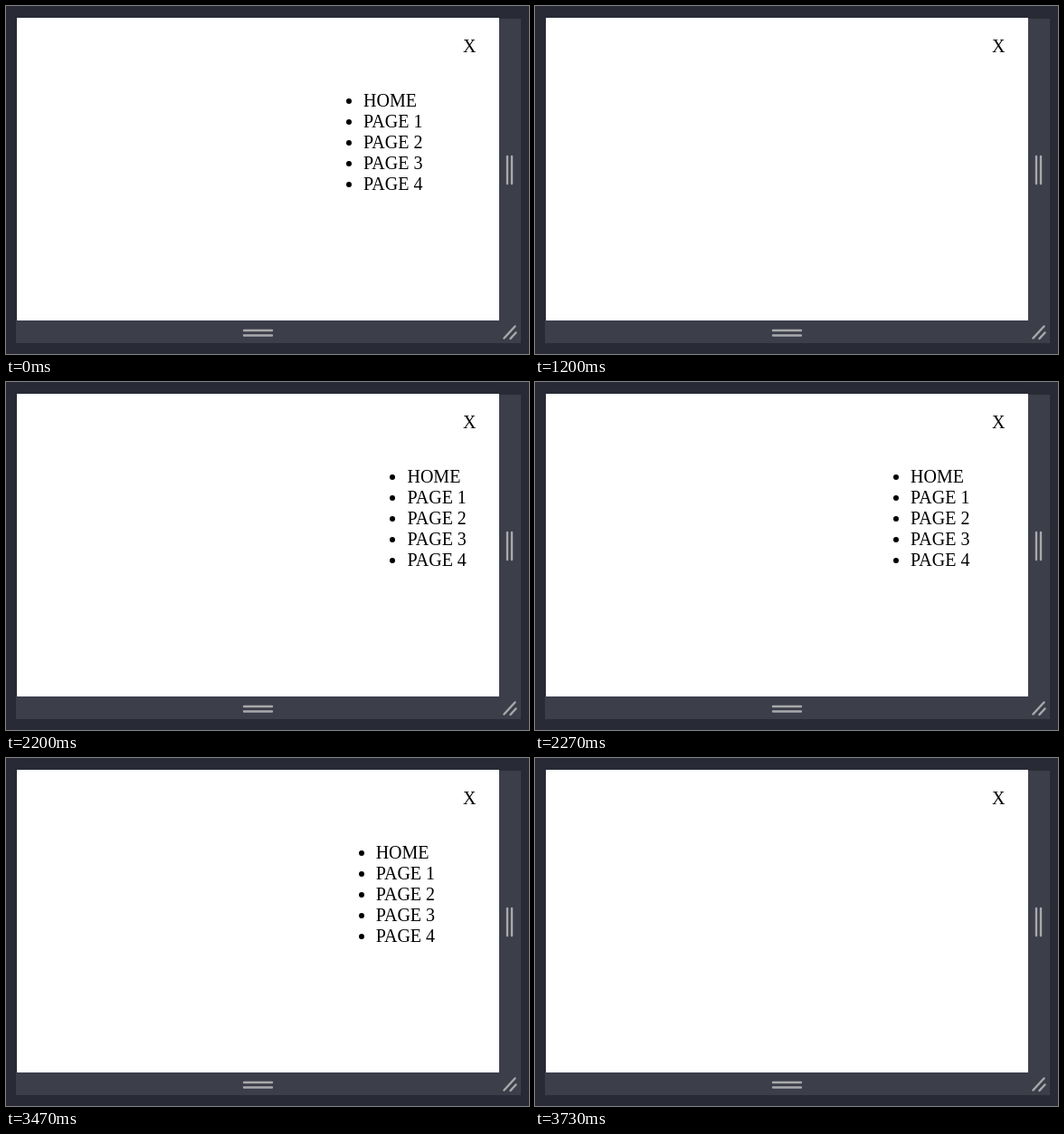
Write an HTML page that moves like this. It is 578x384 px and loops after 4.87 s.

```html
<!DOCTYPE html>
<html lang="en">
<head>
<meta charset="utf-8">
<title>Sliding menu</title>
<style>
  html, body { margin: 0; width: 100%; height: 100%; overflow: hidden; background: #282a35; }
  svg { position: absolute; left: 0; top: 0; }
  .page {
    position: absolute; left: 12px; top: 13px; width: 533px; height: 334px;
    overflow: hidden; background: #fff; color: #000;
    font: 20px/23px "Liberation Serif", "Times New Roman", serif;
  }
  .close { position: absolute; left: 493px; top: 20px; }
  ul { position: absolute; top: 80px; margin: 0; padding-left: 40px; white-space: nowrap; }
</style>
</head>
<body>
<svg width="578" height="384">
  <path fill="#3c3e4a" d="M545 14H569V372H11V347H545Z"/>
  <path fill="none" stroke="#a9a9ab" stroke-width="2.4" stroke-linecap="round"
    d="M554 166V196M559 166V196M263 358H294M263 363.5H294M550.5 366.5L562.5 353.5M557.5 367L563.5 360.5"/>
</svg>
<div class="page">
  <div class="close">X</div>
  <ul id="menu"><li>HOME</li><li>PAGE 1</li><li>PAGE 2</li><li>PAGE 3</li><li>PAGE 4</li></ul>
</div>
<script>
const LOOP = 4870, SLIDE = 400, TRAVEL = 190, OPEN_LEFT = 343;
const STEP = 1000 / 15;
const clicks = [930, 2021, 3433]; // close, open, close
const menu = document.getElementById("menu");

// cubic-bezier(.25, .1, .25, 1)
function ease(x) {
  if (x <= 0) return 0;
  if (x >= 1) return 1;
  let lo = 0, hi = 1;
  for (let i = 0; i < 24; i++) {
    const s = (lo + hi) / 2;
    if (0.75 * s * (1 - s) + s ** 3 < x) lo = s; else hi = s;
  }
  return 0.3 * lo * (1 - lo) ** 2 + 3 * lo * lo * (1 - lo) + lo ** 3;
}

// Hold time at 15 steps per second, each rounded to 10 ms
function snap(t) {
  const tick = n => Math.round(n * STEP / 10) * 10;
  let n = Math.floor(t / STEP) + 1;
  while (tick(n) > t) n--;
  return n * STEP;
}

function draw(now) {
  const t = snap(now % LOOP);
  const [out, back, again] = clicks.map(c => ease((t - c) / SLIDE));
  menu.style.left = OPEN_LEFT + TRAVEL * (out - back + again) + "px";
  requestAnimationFrame(draw);
}

draw(0);
</script>
</body>
</html>
```
